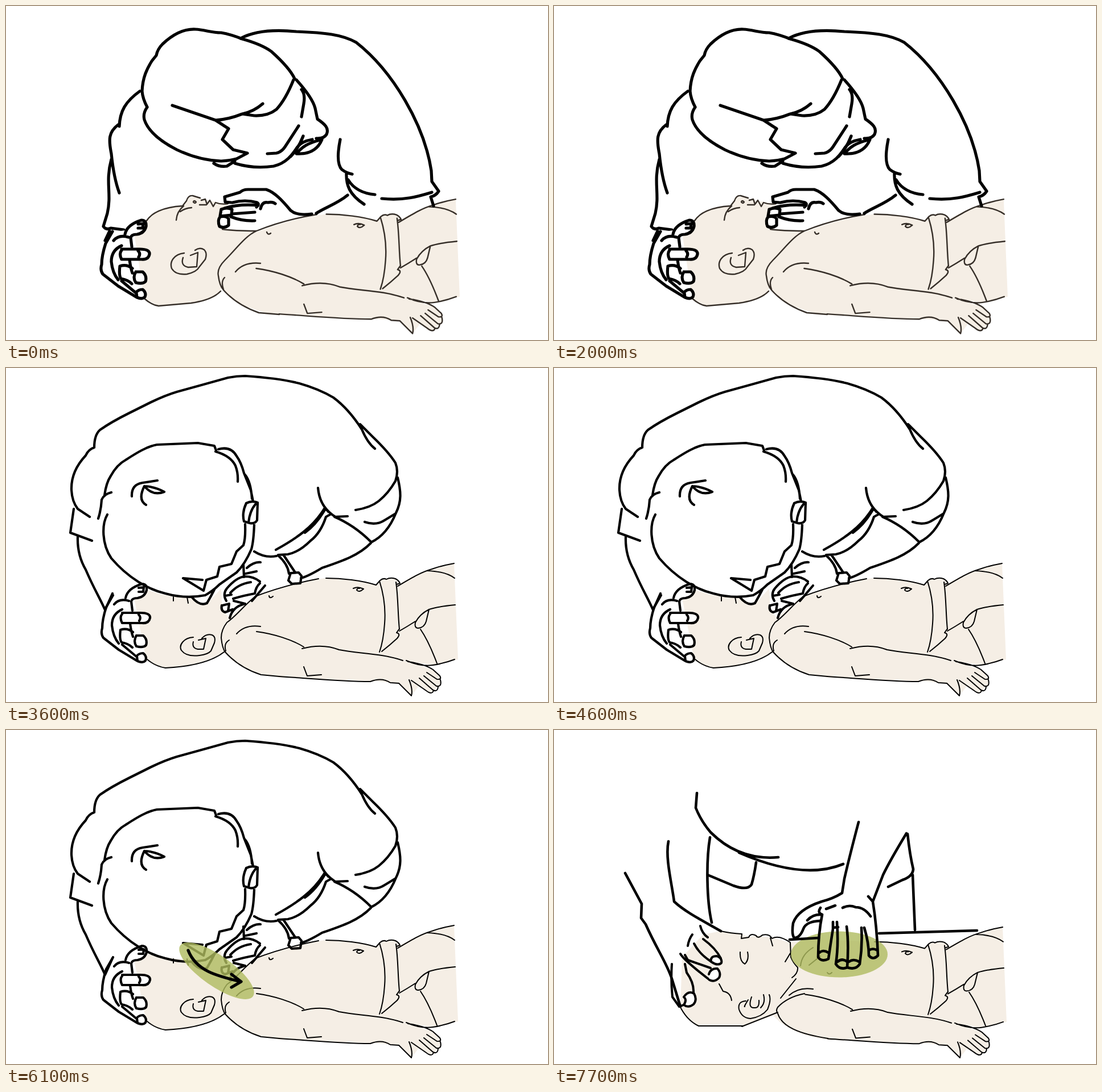
Recreate the animation shown at these times as an HTML page. Size 952 by 588 pixels, loop 8 s.

```html
<!DOCTYPE html>
<html lang="en">
<head>
<meta charset="utf-8">
<title>Infant resuscitation</title>
<style>
  html, body { margin: 0; height: 100%; overflow: hidden; background: #fff; }
  svg { display: block; width: 100vw; height: 100vh; }
  path, ellipse { fill: none; stroke-linecap: round; stroke-linejoin: round; }
  .baby { stroke: #000; stroke-width: 2; }
  .soft { stroke: #352e28; stroke-width: 2.4; }
  .adult { stroke: #000; stroke-width: 4.2; }
  .bold { stroke-width: 5.2; }
  .skin { fill: #f5eee5; stroke: none; }
  .white { fill: #fff; }
  .zone { fill: #b0bc60; fill-opacity: .8; stroke: none; }
  .waves { stroke: #9ba82a; stroke-width: 4.6; }
  .waves path { stroke-linecap: butt; }
</style>
</head>
<body>
<svg viewBox="0 0 952 588">
  <defs>
    <g id="torso">
      <path class="skin" d="M438 402Q500 378 560 370Q620 372 650 382L657 374L668 371L684 371L692 379Q725 360 748 354L787 344L794 513L750 523L703 516L750 531L763 545V558L747 572L725 560L712 577L690 555L640 551L480 545Q410 535 383 500Q375 470 385 455Z"/>
      <path d="M562 370C590 370 625 374 650 382L657 374Q663 369 668 372Q675 368 684 371Q690 374 692 379L686 381
        M656 375C664 400 667 425 665 450Q663 480 656 500M685 377C689 405 688 430 691 460
        M688 384C715 368 730 359 748 354Q765 348 787 344M740 357Q772 358 788 370
        M691 459L686 466Q694 468 687 476Q674 488 660 499M691 463Q705 455 719 446
        M789 417Q758 420 743 425Q727 433 719 448Q717 458 724 458Q735 457 738 446L743 425
        M728 460Q742 480 757 520M703 515Q728 526 750 523Q770 520 788 513
        M440 464C470 468 502 478 523 491M520 494C550 486 570 490 585 496C620 503 660 502 697 515
        M523 526L529 542L554 540M610 388Q618 384 628 389Q620 396 616 391Q617 387 621 388
        M480 543C540 547 590 552 640 552Q660 544 675 554L690 555L712 577Q715 566 708 549
        M706 517Q735 521 750 531L762 542Q766 549 757 548L739 536M763 549Q766 562 756 560L734 542M759 561Q758 571 750 567L726 546M751 568Q748 576 738 568L712 550"/>
    </g>
    <g id="cradle">
      <path class="white" d="M209 395Q220 378 238 377Q247 377 246 388Q243 400 230 402Q220 402 219 408L221 427H235Q253 428 252 437Q250 447 238 446H217L221 468H240Q248 475 245 485Q240 490 228 487L232 501Q240 497 245 504Q246 514 236 515L197 493L170 472Q160 462 186 398Z" style="stroke:none"/>
      <path d="M187 397L175 418Q168 440 168 455Q165 465 170 472L197 493L230 513
        M209 402Q212 385 238 377Q247 377 246 388Q243 400 230 402Q220 402 219 408L221 424M232 384L241 383L240 391L232 391
        M215 407Q198 402 189 413M203 422Q185 430 185 450Q187 470 197 482
        M203 428H235Q253 428 252 437Q250 447 238 446H203Q198 436 203 430M232 431Q237 436 233 442
        M217 447Q219 462 222 470M222 462Q212 454 200 458Q198 475 202 480Q214 482 221 489
        M228 468H240Q248 475 245 485Q240 490 228 487Q222 478 228 468
        M203 484L228 505Q232 499 240 499Q247 505 244 512Q240 517 230 513L229 505"/>
    </g>
    <g id="pressHand">
      <path d="M535 162C525 200 515 240 510 262L506 287Q490 297 470 302C440 312 425 325 420 340Q417 360 422 366Q432 366 438 350Q443 337 467 336M445 335Q455 324 470 325M468 313Q462 322 471 325M478 315L494 309M507 313Q518 307 530 312Q545 312 556 328
        M619 182Q590 230 578 255L560 302L552 293M560 302Q567 345 569 397Q560 406 553 397Q553 375 545 348
        M471 325Q464 360 464 400Q470 409 482 403Q486 375 490 350V338M490 348L499 347M497 338Q500 380 495 412Q502 423 515 418Q518 375 514 346M515 418Q530 423 537 412Q542 380 540 348
        M466 392Q473 386 482 392M498 408Q506 401 515 408M518 408Q526 402 536 408M553 388Q560 383 568 388"/>
    </g>
  </defs>

  <g id="listen">
    <rect width="952" height="588" fill="#fff"/>
    <g class="baby soft">
      <path class="skin" d="M225 400L247 378Q265 355 310 352L320 336L335 336L348 341L390 349L374 372L378 392L440 397L385 455L377 502Q360 520 325 523L268 528L243 515Z"/>
      <use href="#torso" transform="matrix(1.01 0 0 1.015 -5 -9)"/>
      <path d="M247 378C255 365 275 354 310 352L317 343Q320 333 328 334L341 338M329 345Q330 341 334 345Q332 349 329 345M343 342L350 340L353 349L358 342L364 353L368 346Q378 350 390 348M340 350H352M312 352Q300 362 299 377M326 355Q314 356 306 362
        M243 515Q255 526 268 528L325 523C345 520 365 515 377 502M440 396C420 405 405 427 385 447Q370 462 373 475Q375 492 382 500Q405 526 444 540L480 543M382 499Q377 485 384 478M403 468Q418 450 447 453
        M380 393Q400 396 440 396Q490 376 546 367M458 398Q460 404 465 400
        M313 435C295 437 287 450 291 462Q298 474 318 472Q335 468 339 460L350 446Q354 435 348 429Q340 424 332 430M311 443Q306 457 320 460L335 459L337 434L324 439"/>
    </g>
    <g class="waves" id="waves"></g>
    <g class="adult bold">
      <path d="M412 57C440 42 480 42 510 45C560 47 590 50 615 64C680 115 735 210 747 290L748 309L760 326Q755 334 746 336L751 352
        M587 235C582 260 582 280 590 288Q598 294 608 296M598 294C597 315 603 332 629 349M601 306Q615 329 648 332M660 339C700 343 725 335 748 328M600 333C582 348 560 355 545 365
        M537 366Q512 370 500 360C485 342 472 328 457 323H425Q416 323 411 328L384 336L385 345L396 346M398 346Q420 340 441 346Q446 349 440 354M447 357Q450 344 460 346Q468 344 473 348M384 356Q410 348 443 351M397 366L437 363M395 371Q415 379 437 378
        M235 150C210 168 200 185 199 212M197 209C180 222 180 235 185 260C188 290 192 310 199 329M185 270C174 310 186 330 178 365L171 388Q176 395 184 391L207 394M182 396L174 413"/>
      <path class="white" d="M378 358Q388 354 397 358L396 368L376 370ZM376 371Q388 369 391 375V386Q384 392 375 388Q371 378 376 371"/>
      <use href="#cradle"/>
      <g id="head">
        <path d="M248 178Q240 163 239 150C240 125 248 110 256 97L264 87Q266 76 275 67C295 48 315 40 333 41C350 42 360 47 378 47Q395 50 415 58C440 65 455 72 466 80C485 97 500 113 507 128
          M505 130C497 150 488 168 475 182Q460 194 436 193L415 190M451 172Q435 186 415 190Q390 200 368 201L292 175
          M248 178C243 185 241 192 243 200C250 222 275 240 300 253C325 265 350 272 378 273Q395 272 405 269L424 259L399 253L380 235L391 216L368 201
          M365 277Q375 284 388 282L402 273M402 277C425 284 450 285 470 282C492 277 503 262 512 248Q520 238 538 235
          M459 260L475 259Q484 257 490 248L514 211M510 260C520 248 530 241 555 235Q544 262 510 260
          M510 130C528 150 540 168 543 180L547 199C560 208 568 215 563 226Q558 234 545 233
          M519 147Q526 155 523 172L519 195M522 229Q514 250 500 265"/>
      </g>
    </g>
  </g>

  <g id="breathe">
    <rect width="952" height="588" fill="#fff"/>
    <g class="baby">
      <path class="skin" d="M225 405L250 391Q285 405 330 404L345 416L358 410L378 388L380 425L392 440L420 415L438 402L385 455L383 500Q340 525 280 528Q260 525 246 513Z"/>
      <use href="#torso"/>
      <path d="M248 513Q262 525 280 528C320 526 360 518 383 500M438 402C418 418 404 437 388 448Q378 461 378 475Q380 494 385 500Q410 528 448 540L480 543M386 498Q382 485 392 479M405 468Q420 451 447 455M438 402Q490 382 549 371M462 401Q463 407 469 402M294 403V410M318 403L320 414
        M329 474C312 475 303 488 308 497Q317 509 340 506Q355 504 360 498L366 484Q369 473 362 470Q352 467 344 476M329 482Q326 493 337 495H347L351 476L338 479"/>
    </g>
    <g class="adult">
      <use href="#cradle" transform="translate(1 3)"/>
      <path d="M417 346L418 368M423 352Q435 341 447 342M421 362L440 358M387 410Q380 398 388 388Q405 368 420 367Q435 367 446 376M394 396Q408 380 430 377M385 401L396 399M399 406Q420 400 437 397Q439 385 446 379M432 410L455 383M379 418Q377 428 385 430L398 425M380 418L392 415L390 428M393 440Q398 420 420 415L400 410"/>
      <g id="rescuer">
        <path d="M155 140Q155 118 165 109Q185 95 215 80L255 60Q280 48 300 42L347 29L390 17Q405 14 420 14Q480 18 515 27Q550 37 575 52Q602 72 625 108Q635 132 648 142
          M622 99L645 122Q672 148 684 167Q690 182 684 199Q672 220 655 234Q640 246 614 250M688 193C694 218 695 235 685 255C675 280 660 298 641 307M577 262Q612 277 641 306M577 262L600 261M548 211C550 235 560 250 577 261M630 271Q650 278 665 268L683 257
          M641 308C620 330 590 340 555 352Q530 367 518 370M155 140Q145 143 140 154C125 170 114 190 115 215Q116 235 126 248L147 262M119 248L113 290L151 304M126 296C125 320 130 338 140 355C155 390 165 405 174 426L187 397
          M436 323Q455 335 475 331M474 320C510 300 540 280 560 246L566 253M478 329L495 328Q515 324 535 304Q553 290 562 262L571 257M561 248Q545 276 525 290M478 330Q495 345 497 362M488 330L508 360M500 361L514 360L519 366L517 379L502 380L496 374Z
          M173 224Q176 202 184 190Q195 170 210 162C230 149 248 138 265 135L337 132L366 137L369 145M185 219Q172 222 168 232Q167 250 162 265M178 258C168 275 168 310 185 335C215 370 250 390 280 397C305 404 330 404 350 400Q364 392 375 381
          M326 403Q340 420 353 414Q360 402 366 390M373 143Q395 137 405 155Q413 166 418 185L430 215L434 235M368 147Q395 155 403 172Q408 185 407 200M420 188Q430 200 432 230
          M422 238Q432 233 442 237L441 268Q437 275 428 273L418 270Q414 255 422 238M438 240Q428 252 426 272
          M420 275Q421 300 417 312L405 323L396 345L375 350L371 367L352 373L347 392L311 370L345 373M436 275Q435 305 431 319Q420 345 405 360L375 381
          M221 226Q220 205 240 202L266 198M243 208Q262 209 278 218Q258 226 243 208Q231 232 246 241"/>
      </g>
    </g>
    <g id="airflow">
      <ellipse class="zone" rx="78" ry="27" transform="translate(370 424) rotate(35)"/>
      <path class="adult bold" d="M320 388C334 424 370 433 412 443M396 430L413 443L396 453"/>
    </g>
  </g>

  <g id="compress">
    <rect width="952" height="588" fill="#fff"/>
    <g class="baby">
      <path class="skin" d="M222 487L225 400L262 360L293 354L330 359L342 365L355 361L385 366L414 374L460 369L565 373L590 460L393 500L333 522H254Q235 512 222 487Z"/>
      <use href="#torso" transform="matrix(1 0 0 .987 1 7.5)"/>
      <path d="M293 354Q310 358 330 359L329 367L342 365Q345 357 355 362Q358 368 366 361Q378 358 383 367Q395 360 415 374L416 400Q420 410 428 418Q429 428 418 436
        M327 391Q326 407 335 412Q343 405 340 391M380 366L384 380M406 408L415 393M433 415Q435 395 455 383M448 414L468 398M398 472L425 438M223 490Q235 512 254 521H333M330 522Q365 508 393 497
        M290 447L297 460Q310 462 312 476M337 477Q322 478 325 492Q330 507 345 508Q365 505 375 492Q382 475 378 466M341 475Q333 488 335 487M347 470Q340 490 352 489Q361 490 360 476M368 466Q372 480 363 489
        M440 464Q410 470 393 488Q389 494 393 499C400 522 430 535 481 543M413 467Q430 452 455 456M480 427Q483 432 488 427"/>
    </g>
    <ellipse id="pressure" class="zone" cx="501" cy="395" rx="85" ry="40.5"/>
    <g class="adult bold" style="stroke-width:4.6">
      <path d="M251 111L249 137Q258 160 275 180C310 215 350 228 394 224M325 216C380 240 450 260 508 236M201 196C195 225 207 270 211 302C230 320 260 335 293 354M274 189C267 230 268 300 277 339M272 256L315 274Q340 283 347 272Q352 255 355 233
        M125 252L154 306L153 331L161 342C180 385 198 410 207 438L222 487M621 183Q625 220 631 245Q630 258 612 264L587 276M630 255L634 352M571 358L743 353M414 369L465 366"/>
      <g style="stroke-width:4">
        <path d="M207 412Q205 440 208 470L220 487L230 483M230 412L233 427Q246 445 245 462M222 394Q227 404 272 439M230 396L235 405L275 419M257 345Q260 358 270 365M262 368Q284 384 293 402M235 380Q237 368 243 360M246 376Q255 394 275 407"/>
        <path class="white" d="M228 470Q236 458 246 464Q252 475 245 483Q236 490 228 484Q234 475 228 470M272 430Q275 419 287 420Q294 428 290 436Q282 445 273 440M276 408Q274 398 286 398Q296 402 294 410Q288 416 276 408"/>
      </g>
      <use href="#pressHand" id="press"/>
    </g>
  </g>
</svg>
<script>
const el = id => document.getElementById(id);
const clamp = (v, lo, hi) => Math.min(hi, Math.max(lo, v));
const show = (id, on) => el(id).style.visibility = on ? 'visible' : 'hidden';
const move = (id, value) => el(id).setAttribute('transform', value);

el('waves').innerHTML = [0, 1, 2, 3].map(i =>
  `<path d="M${278 + 7.3 * i} ${281 + 19 * i}Q328 ${247 + 22 * i} ${381 - 5.5 * i} ${278 + 20 * i}"/>`).join('');

// Cross-fades advance in quarters every 200 ms; poses alternate every 500 ms.
const fade = (t, start) => clamp((Math.floor((t - start) / 200) + 1) / 4, 0, 1);
const beat = (t, start) => Math.floor(clamp(t - start, 0, 2999) / 500) % 2;

function draw() {
  const t = performance.now() % 8000;
  const bowed = beat(t, 0), blowing = beat(t, 3600), pressing = t >= 7700;
  el('breathe').style.opacity = fade(t, 3000);
  el('compress').style.opacity = fade(t, 6600);
  show('waves', bowed);
  move('head', bowed ? 'rotate(-2.6 400 165)' : '');
  show('airflow', blowing);
  move('rescuer', blowing ? 'translate(0 5)' : '');
  show('pressure', pressing);
  move('press', pressing ? '' : 'translate(0 -15)');
  requestAnimationFrame(draw);
}
draw();
</script>
</body>
</html>
```
